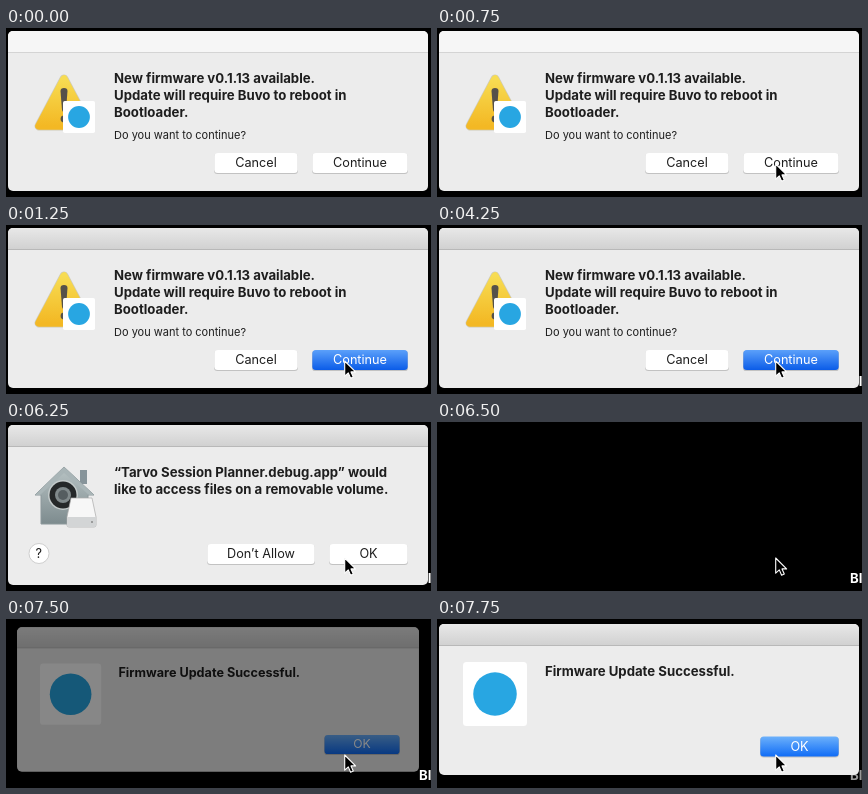
Recreate the animation shown at these times as an HTML page. Size 425 px wide and 169 px high, loop 8000 ms.

```html
<!DOCTYPE html>
<html lang="en">
<head>
<meta charset="utf-8">
<style>
html, body { margin: 0; width: 100%; height: 100%; overflow: hidden; background: #000; }
svg { display: block; width: 425px; height: 169px; font: 12.7px Inter, sans-serif; }
.b { font-weight: 700; font-size: 13.2px; }
.s { font-size: 11px; }
</style>
</head>
<body>
<svg id="stage" viewBox="0 0 425 169"></svg>
<script>
const stage = document.getElementById('stage');

const gradient = (id, ...colors) => `<linearGradient id="${id}" x2="0" y2="1">` +
  colors.map((c, i) => `<stop offset="${i / (colors.length - 1)}" stop-color="${c}"/>`).join('') +
  '</linearGradient>';

const text = (x, y, str, cls = '', fill = '#1e1e1e') =>
  `<text x="${x}" y="${y}" class="${cls}" fill="${fill}">${str}</text>`;

const button = (x, y, w, label, fill = '#fff', ink = '#1e1e1e') => `
  <rect x="${x}" y="${y + .5}" width="${w}" height="20.500" rx="3.500" fill="#c2c2c2"/>
  <rect x="${x + .3}" y="${y}" width="${w - .6}" height="20" rx="3.500" fill="${fill}"/>
  <text x="${x + w / 2}" y="${y + 14.2}" text-anchor="middle" fill="${ink}">${label}</text>`;

const panel = (y, h) => `
  <rect x="2" y="${y}" width="420" height="${h}" rx="5" fill="#ececec"/>
  <path class="bar" d="M2 ${y + 21}v-16a5 5 0 0 1 5-5h410a5 5 0 0 1 5 5v16z" fill="url(#bar)"/>
  <path class="rule" d="M2 ${y + 21.5}h420" stroke="#b8b8b8"/>`;

const badge = (x, y, size) => `
  <rect x="${x}" y="${y}" width="${size}" height="${size}" rx="${size / 18}" fill="#fff"/>
  <circle cx="${x + size / 2}" cy="${y + size / 2}" r="${size * .34}" fill="#28a6e2"/>`;

const triangle = (color, edge) =>
  `<path d="M58 51L33 98H83z" fill="${color}" stroke="${color}" stroke-width="${edge}" stroke-linejoin="round"/>`;

const caution = `
  ${triangle('#cfcbb8', 9)}${triangle('url(#amber)', 7.5)}
  <path d="M54.500 63q0-3 3.500-3t3.500 3l-1.500 19q-.3 2-2 2t-2-2z" fill="#55514a"/>
  <circle cx="58" cy="91" r="3.400" fill="#55514a"/>`;

const house = `
  <path d="M74 48h7v14h-7z" fill="#87949a"/>
  <path d="M58 45L88 73H82V102H35V73H29z" fill="url(#wall)" stroke="#8c989b" stroke-linejoin="round"/>
  <path d="M58 45L88 73H83L58 51 34 73H29z" fill="#a9b5b7"/>
  <circle cx="57" cy="73" r="15" fill="#c3caca"/>
  <circle cx="57" cy="73" r="13.500" fill="#252829"/>
  <circle cx="57" cy="73" r="8" fill="#80898b"/>
  <circle cx="57" cy="73" r="5" fill="#555d60"/>
  <path d="M65 76h21l4 19v8q0 2-2 2H63q-2 0-2-2v-8z" fill="#f7f7f7" stroke="#aaa" stroke-width=".7"/>
  <path d="M61 95h29v8q0 2-2 2H63q-2 0-2-2z" fill="#d3d5d6"/>
  <circle cx="86" cy="100" r="1" fill="#888"/>`;

stage.innerHTML = `
  <defs>
    ${gradient('bar', '#e8e8e8', '#d1d1d1')}
    ${gradient('blue', '#6cb1fb', '#106cf6')}
    ${gradient('pressed', '#5ba0fa', '#0b5ce8')}
    ${gradient('amber', '#f7dc52', '#f3b824')}
    ${gradient('wall', '#b9c4c5', '#7d8b8e')}
  </defs>
  <rect width="425" height="169"/>
  <g id="label">${text(413, 161, 'BI', 'b', '#fff')}</g>
  <g id="update">
    ${panel(3, 160)}${caution}${badge(57, 73, 32)}
    ${text(108, 55, 'New firmware v0.1.13 available.', 'b')}
    ${text(108, 72, 'Update will require Buvo to reboot in', 'b')}
    ${text(108, 89, 'Bootloader.', 'b')}
    ${text(108, 111, 'Do you want to continue?', 's')}
    ${button(208, 125, 84, 'Cancel')}
    ${button(306, 125, 96, 'Continue')}
    <g id="active">${button(306, 125, 96, 'Continue', 'url(#pressed)', '#fff')}</g>
  </g>
  <g id="access">
    ${panel(3, 160)}${house}
    ${text(108, 55, '“Tarvo Session Planner.debug.app” would', 'b')}
    ${text(108, 72, 'like to access files on a removable volume.', 'b')}
    <circle cx="33" cy="131.500" r="10" fill="#fff" stroke="#c4c4c4" stroke-width=".8"/>
    ${text(29.5, 136, '?')}
    ${button(201, 122, 108, 'Don’t Allow')}
    ${button(323, 122, 79, 'OK')}
  </g>
  <g id="done">
    ${panel(5, 151)}${badge(26, 43, 64)}
    ${text(108, 57, 'Firmware Update Successful.', 'b')}
    ${button(323, 117.5, 79, 'OK', 'url(#blue)', '#fff')}
  </g>
  <path id="cursor" d="M.7 1V16.200L4.300 12.900 6.600 18.200 9.300 17 7 11.900H11.600z" stroke="#fff" stroke-width="1.100" stroke-linejoin="round"/>`;

const el = id => document.getElementById(id);
const show = (id, on) => el(id).style.display = on ? '' : 'none';
const updateBar = document.querySelector('#update .bar');
const updateRule = document.querySelector('#update .rule');
const start = performance.now();

function draw(now) {
  const t = Math.max(0, now - start) % 8000;
  const focused = t >= 1250, opening = t < 7750;

  show('update', t < 4500);
  show('active', focused);
  updateBar.setAttribute('fill', focused ? 'url(#bar)' : '#f6f6f6');
  updateRule.setAttribute('stroke', focused ? '#b8b8b8' : '#d4d4d4');

  show('access', t >= 4500 && t < 6500);

  show('done', t >= 7500);
  el('done').setAttribute('opacity', opening ? .53 : 1);
  el('done').setAttribute('transform', opening ? 'translate(212 80.5) scale(.957) translate(-212 -80.5)' : '');

  show('label', t >= 4250);
  el('label').setAttribute('opacity', opening ? 1 : .6);

  show('cursor', t >= 500);
  el('cursor').setAttribute('transform', t < 750 ? 'translate(329 128)' : 'translate(338 135)');
  requestAnimationFrame(draw);
}
draw(start);
</script>
</body>
</html>
```
